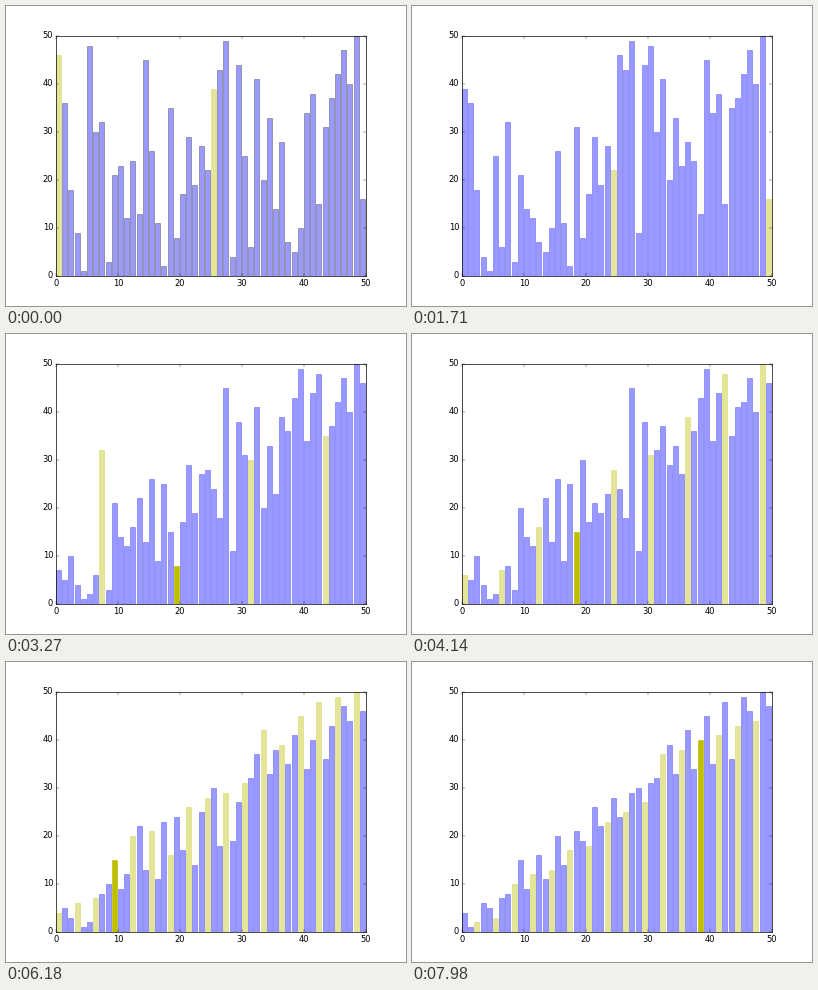
Animation, 400 px wide and 300 px high, one loop 8 s. Source, as a matplotlib script:

```python
import matplotlib.pyplot as plt
from matplotlib.animation import FuncAnimation

plt.style.use("classic")
plt.rcParams.update({
    "figure.facecolor": "white",
    "savefig.dpi": "figure",
    "font.family": "DejaVu Sans",
})

DATA = [46, 36, 18, 9, 1, 48, 30, 32, 3, 21,
        23, 12, 24, 13, 45, 26, 11, 2, 35, 8,
        17, 29, 19, 27, 22, 39, 43, 49, 4, 44,
        25, 6, 41, 20, 33, 14, 28, 7, 5, 10,
        34, 38, 15, 31, 37, 42, 47, 40, 50, 16]
N = len(DATA)
FRAMES = 267
STEP_MS = 30
ALPHA = 0.4


def shell_sort(values):
    """Yield (values, group, cursor, visited) for every step of the sort."""
    a = list(values)
    visited = set()
    gap = N // 2
    while gap:
        for start in range(gap):
            group = set(range(start, N, gap))
            visited |= group
            seen = frozenset(visited)
            yield a[:], group, None, seen
            for i in range(start + gap, N, gap):
                pos = i
                yield a[:], group, pos, seen
                while pos >= gap and a[pos - gap] > a[pos]:
                    a[pos - gap], a[pos] = a[pos], a[pos - gap]
                    pos -= gap
                    yield a[:], group, pos, seen
        gap //= 2


steps = list(shell_sort(DATA))[:FRAMES]

fig = plt.figure(figsize=(8, 6), dpi=50)
ax = fig.add_axes([0.125, 0.1, 0.775, 0.8])
bars = ax.bar(range(N), DATA, width=0.8, align="edge",
              color="b", edgecolor="k", alpha=ALPHA)
ax.set_xlim(0, N)
ax.set_ylim(0, 50)
ax.set_xticks(range(0, 51, 10))
ax.set_yticks(range(0, 51, 10))


def draw(frame):
    values, group, cursor, visited = steps[frame]
    for i, bar in enumerate(bars):
        face = "y" if i in group else "b"
        bar.set_height(values[i])
        bar.set_facecolor(face)
        bar.set_edgecolor(face if i in visited else "k")
        bar.set_alpha(1 if i == cursor else ALPHA)
    return list(bars)


anim = FuncAnimation(fig, draw, frames=FRAMES, init_func=lambda: draw(0),
                     interval=STEP_MS, repeat=True, repeat_delay=0)
plt.show()
```
